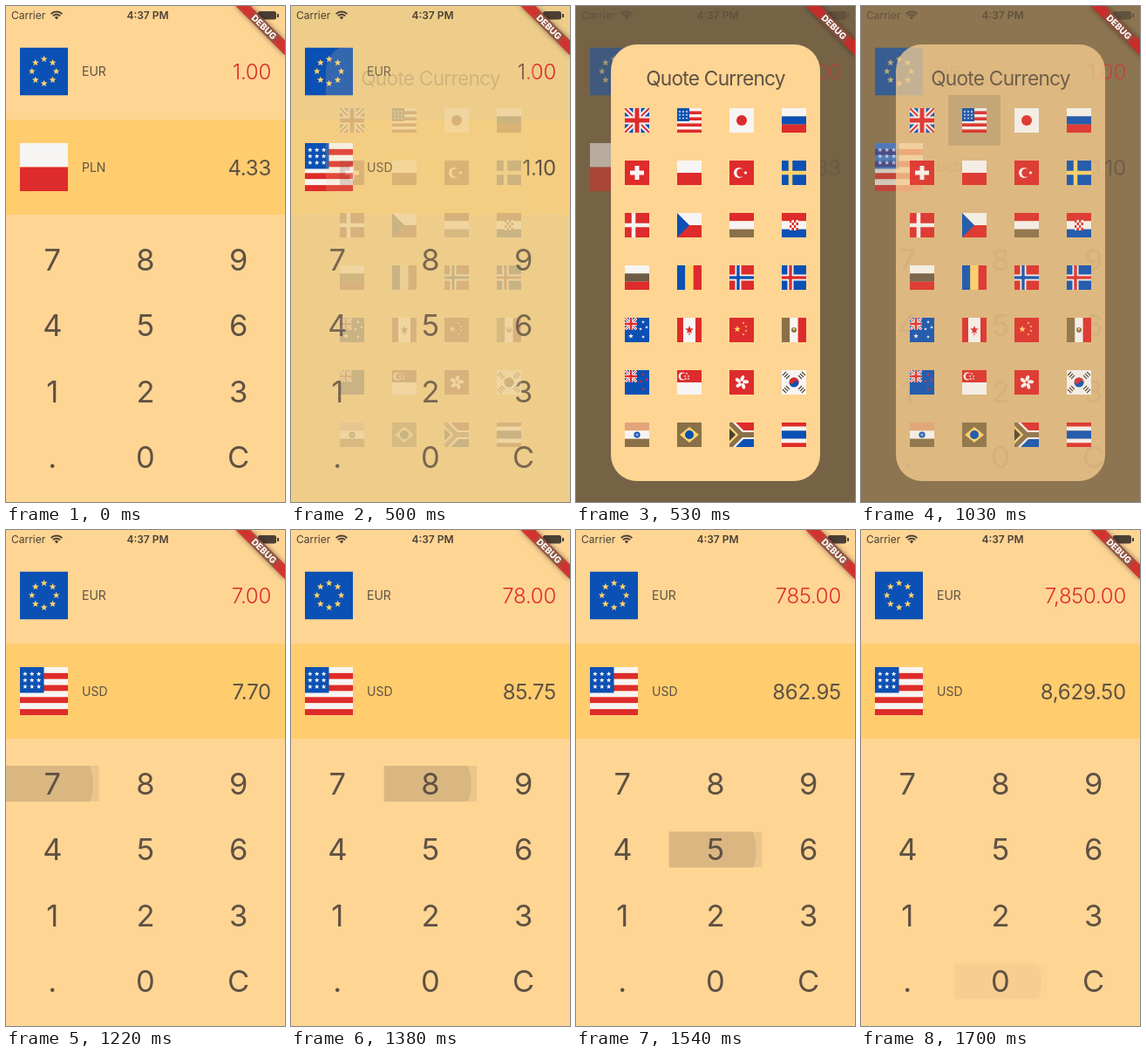
These frames come from a looping animation (320x568 px, 2200 ms). An HTML page with a canvas:

```html
<!DOCTYPE html>
<html lang="en">
<head>
<meta charset="utf-8">
<title>Currency converter</title>
<style>
html, body { margin: 0; width: 100%; height: 100%; overflow: hidden; background: #ffd594; }
canvas { display: block; }
</style>
</head>
<body>
<canvas id="stage" width="320" height="568"></canvas>
<script>
const LOOP = 2200, RATE = 1.099299;
const RED = '#de2b2b', BLUE = '#0b50b4', WHITE = '#f7f5f3', GREEN = '#8a7048', GOLD = '#ffd36a';
const PAPER = '#ffd594', INK = '#5f5143', DARK = '#4b4035';
const KEYS = '789456123.0C';
const stage = document.getElementById('stage').getContext('2d');
let g = stage;

// ---- drawing helpers ----
function rect(color, x, y, w, h) {
  g.fillStyle = color;
  g.fillRect(x, y, w, h);
}
function disc(color, x, y, r) {
  g.fillStyle = color;
  g.beginPath();
  g.arc(x, y, r, 0, 7);
  g.fill();
}
function poly(color, ...p) {
  g.fillStyle = color;
  g.beginPath();
  for (let i = 0; i < p.length; i += 2) g.lineTo(p[i], p[i + 1]);
  g.fill();
}
function panel(color, x, y, w, h, r) {
  g.fillStyle = color;
  g.beginPath();
  g.roundRect(x, y, w, h, r);
  g.fill();
}
function line(color, width, ...p) {
  g.strokeStyle = color;
  g.lineWidth = width;
  g.beginPath();
  for (let i = 0; i < p.length; i += 2) g.lineTo(p[i], p[i + 1]);
  g.stroke();
}
function star(color, x, y, r) {
  const p = [];
  for (let i = 0; i < 10; i++) {
    const a = i * Math.PI / 5, d = i % 2 ? r * 0.42 : r;
    p.push(x + d * Math.sin(a), y - d * Math.cos(a));
  }
  poly(color, ...p);
}
function text(s, x, y, size, color, { align = 'left', weight = 400, gap = 0 } = {}) {
  g.font = `${weight} ${size}px Inter, Roboto, sans-serif`;
  g.letterSpacing = gap + 'px';
  g.textAlign = align;
  g.fillStyle = color;
  g.fillText(s, x, y);
}
function clipped(x, y, w, h, draw) {
  g.save();
  g.beginPath();
  g.rect(x, y, w, h);
  g.clip();
  draw();
  g.restore();
}
function faded(alpha, draw) {
  g.save();
  g.globalAlpha *= alpha;
  draw();
  g.restore();
}

// ---- flags on a 28 x 28 grid ----
const rows = (...c) => c.forEach((color, i) => rect(color, 0, i * 28 / c.length, 28, 28 / c.length));
const cols = (...c) => c.forEach((color, i) => rect(color, i * 28 / c.length, 0, 28 / c.length, 28));
function cross(color, w, cx = 10) {
  rect(color, cx - w / 2, 0, w, 28);
  rect(color, 0, 14 - w / 2, 28, w);
}
function nordic(back, outer, inner) {
  rows(back);
  cross(outer, inner ? 7 : 4.5);
  if (inner) cross(inner, 3.4);
}
function jack(s) {
  clipped(0, 0, s, s, () => {
    g.scale(s / 28, s / 28);
    rows(BLUE);
    for (const [c, w] of [[WHITE, 6], [RED, 2]]) {
      line(c, w, 0, 0, 28, 28);
      line(c, w, 28, 0, 0, 28);
    }
    cross(WHITE, 9, 14);
    cross(RED, 5, 14);
  });
}
function southern(color) {
  rows(BLUE);
  jack(14);
  for (const [x, y] of [[21, 5], [18, 13], [25, 11], [21, 22]]) star(color, x, y, 2);
}
function crescent(x, y, r, back) {
  disc(WHITE, x, y, r);
  disc(back, x + r * 0.35, y, r * 0.8);
}
const flags = {
  eu() {
    rows(BLUE);
    for (let i = 0; i < 8; i++) {
      const a = i * Math.PI / 4;
      star(GOLD, 14.1 + 7.1 * Math.sin(a), 13.9 - 7.1 * Math.cos(a), 2.1);
    }
  },
  gb() { jack(28); },
  us() {
    rows(WHITE, RED, WHITE, RED, WHITE, RED, WHITE, RED);
    rect(BLUE, 0, 0, 14, 15);
    for (let i = 0; i < 9; i++) star(WHITE, 3 + i % 3 * 4, 4 + (i / 3 | 0) * 3.7, 1.5);
  },
  jp() { rows(WHITE); disc(RED, 14, 14, 6); },
  ru() { rows(WHITE, BLUE, RED); },
  ch() { rows(RED); rect(WHITE, 11.5, 6, 5, 16); rect(WHITE, 6, 11.5, 16, 5); },
  pl() { rows(WHITE, RED); },
  tr() { rows(RED); crescent(11, 14, 6, RED); star(WHITE, 18.5, 14, 2.6); },
  se() { nordic(BLUE, GOLD); },
  dk() { nordic(RED, WHITE); },
  cz() { rows(WHITE, RED); poly(BLUE, 0, 0, 14, 14, 0, 28); },
  hu() { rows(RED, WHITE, GREEN); },
  hr() {
    rows(RED, WHITE, BLUE);
    for (let i = 0; i < 16; i++)
      rect((i + (i >> 2)) % 2 ? WHITE : RED, 9 + i % 4 * 2.5, 8 + (i >> 2) * 3, 2.5, 3);
  },
  bg() { rows(WHITE, '#6e5c48', RED); },
  ro() { cols(BLUE, GOLD, RED); },
  no() { nordic(RED, WHITE, BLUE); },
  is() { nordic(BLUE, WHITE, RED); },
  au() { southern(WHITE); star(WHITE, 7, 21, 3); },
  ca() {
    rows(WHITE);
    rect(RED, 0, 0, 7, 28);
    rect(RED, 21, 0, 7, 28);
    star(RED, 14, 14, 5);
    rect(RED, 13.5, 14, 1, 6);
  },
  cn() {
    rows(RED);
    star(GOLD, 9, 13, 4);
    for (const [x, y] of [[16, 6], [19, 10], [19, 15], [16, 19]]) star(GOLD, x, y, 1.6);
  },
  mx() { cols(GREEN, WHITE, RED); disc(GREEN, 14, 14, 3); disc(GOLD, 14, 13, 1.2); },
  nz() { southern(RED); },
  sg() {
    rows(RED, WHITE);
    crescent(6, 7, 4.5, RED);
    for (const [x, y] of [[11, 4], [9, 7], [13, 7], [10, 10], [13, 10]]) star(WHITE, x, y, 1.4);
  },
  hk() {
    rows(RED);
    g.save();
    g.translate(14, 14);
    for (let i = 0; i < 5; i++) {
      g.fillStyle = WHITE;
      g.beginPath();
      g.ellipse(0.8, -4.6, 2, 3.6, 0.4, 0, 7);
      g.fill();
      g.rotate(Math.PI * 0.4);
    }
    g.restore();
  },
  kr() {
    rows(WHITE);
    disc(BLUE, 14, 14, 5.5);
    g.fillStyle = RED;
    g.beginPath();
    g.arc(14, 14, 5.5, 3.5, 6.64);
    g.fill();
    disc(RED, 11.5, 13.2, 2.5);
    disc(BLUE, 16.5, 14.8, 2.5);
    for (const x of [5, 23]) for (const y of [6, 22])
      for (const d of [-2, 0, 2]) {
        const s = (x - 14) * (y - 14) > 0 ? 1 : -1;
        line(DARK, 1.1, x + d - 2, y + s * (d + 2), x + d + 2, y + s * (d - 2));
      }
  },
  in() { rows('#e3a578', WHITE, GREEN); disc(BLUE, 14, 14, 3.6); disc('#7897cb', 14, 14, 2); },
  br() { rows(GREEN); poly(GOLD, 14, 5, 25, 14, 14, 23, 3, 14); disc(BLUE, 14, 14, 5); },
  za() {
    rows(RED, BLUE);
    for (const [c, w] of [[WHITE, 10], [GREEN, 5.5]]) {
      line(c, w, -2, -2, 14, 14, 30, 14);
      line(c, w, -2, 30, 14, 14, 30, 14);
    }
    poly(GOLD, 0, 4, 10, 14, 0, 24);
    poly(DARK, 0, 7, 7, 14, 0, 21);
  },
  th() { rows(RED, WHITE, BLUE, BLUE, WHITE, RED); }
};
function flag(name, x, y, size) {
  clipped(x, y, size, size, () => {
    g.translate(x, y);
    g.scale(size / 28, size / 28);
    flags[name]();
  });
}

// ---- screens ----
function statusBar() {
  text('Carrier', 6, 15, 12, DARK);
  text('4:37 PM', 162.5, 15, 12, DARK, { align: 'center', weight: 600 });
  g.strokeStyle = DARK;
  g.lineWidth = 2;
  for (const r of [9, 5.8]) {
    g.beginPath();
    g.arc(58, 15.5, r, -2.36, -0.78);
    g.stroke();
  }
  poly(DARK, 58, 15.5, 55.7, 12.8, 58, 11.8, 60.3, 12.8);
  panel(DARK, 289, 6, 21, 9.5, 2.5);
  rect(DARK, 311, 9, 2, 4);
}
function banner() {
  g.save();
  g.translate(320, 0);
  g.rotate(Math.PI / 4);
  g.save();
  g.shadowColor = 'rgba(0,0,0,.5)';
  g.shadowBlur = 6;
  const tint = g.createLinearGradient(-40, 0, 40, 0);
  [[0, '#d62a2a'], [0.22, '#d62a2a'], [0.32, '#90503e'], [0.7, '#90503e'], [0.8, '#d62a2a'], [1, '#d62a2a']]
    .forEach(stop => tint.addColorStop(...stop));
  g.globalAlpha = 0.88;
  rect(tint, -40, 28, 80, 12);
  g.restore();
  text('DEBUG', 0, 37.7, 10.2, '#fff', { align: 'center', weight: 800 });
  g.restore();
}
function amount(s, y, color, weight) {
  text(s, 304, y, 24, color, { align: 'right', weight, gap: -0.25 });
}
function amounts({ base, quote, mixed }) {
  amount(base, 84, RED, 300);
  if (mixed) clipped(250, 60, 21, 30, () => amount(base, 84, INK, 300));
  amount(quote, 193.5, INK, 400);
}
function press(key, strength) {
  const x = 106.7 * (key % 3), y = 270 + 75.4 * (key / 3 | 0);
  faded(strength, () => clipped(x, y, 106.7, 41, () => {
    rect('#ebc68c', x, y, 106.7, 41);
    disc('#dab681', x + 43, y + 21, 57);
  }));
}
function home(code, state, { next = state, mix = 1, paper = PAPER, band = 1, detail = 1 } = {}) {
  rect(paper, 0, 0, 320, 568);
  faded(band, () => rect('#ffcc6e', 0, 130, 320, 109));
  faded(detail, () => {
    statusBar();
    flag('eu', 16, 47.5, 55);
    text('EUR', 87, 80, 14, INK);
    flag(code === 'PLN' ? 'pl' : 'us', 16, 157, 55);
    text(code, 87, 189.5, 14, INK);
    for (const [s, k] of [[state, 1 - mix], [next, mix]]) {
      if (k <= 0) continue;
      if (s.key >= 0) press(s.key, k * s.glow);
      faded(k, () => amounts(s));
    }
    [...KEYS].forEach((c, i) =>
      text(c, 53.3 + 106.7 * (i % 3), 303 + 75.4 * (i / 3 | 0), 34.5, INK, { align: 'center' }));
  });
}
function dialog(color, alpha) {
  faded(alpha, () => panel(color, 40, 44, 240, 500, 30));
}

// Title and flags are painted once so they can fade as one layer.
const sheet = document.createElement('canvas');
sheet.width = 320;
sheet.height = 568;
g = sheet.getContext('2d');
text('Quote Currency', 160, 91.3, 22.7, INK, { align: 'center', gap: -0.75 });
'gb us jp ru ch pl tr se dk cz hu hr bg ro no is au ca cn mx nz sg hk kr in br za th'.split(' ')
  .forEach((name, i) => flag(name, 56 + 60 * (i % 4), 117 + 60 * (i >> 2), 28));
g = stage;
function choices(alpha, filter = 'none') {
  faded(alpha, () => {
    g.filter = filter;
    g.drawImage(sheet, 0, 0);
  });
}

// ---- timeline ----
const money = n => n.toLocaleString('en-US', { minimumFractionDigits: 2, maximumFractionDigits: 2 });
const start = { base: '1.00', quote: '4.33' };
const typed = [{ base: '1.00', quote: '1.10', mixed: true }];
[7, 78, 785, 7850].forEach((n, i) => typed.push({
  base: money(n), quote: money(n * RATE),
  key: KEYS.indexOf(String(n).at(-1)), glow: i < 3 ? 1 : 0.18
}));

function paint(t) {
  if (t < 500) {
    home('PLN', start);
  } else if (t < 530) {
    home('USD', typed[0], { paper: '#eecd8a', band: 0.35 });
    dialog('#eecd8a', 0.18);
    choices(0.2, 'saturate(0.3)');
  } else if (t < 1030) {
    home('PLN', start, { paper: '#766346', band: 0, detail: 0.5 });
    dialog(PAPER, 1);
    choices(1);
  } else if (t < 1060) {
    home('USD', typed[0], { paper: '#8c7550', band: 0, detail: 0.65 });
    dialog(PAPER, 0.7);
    rect('rgba(70,70,70,.16)', 100, 102, 60, 58);
    choices(0.87);
  } else {
    // each key takes 160 ms: two blended 30 ms steps, then a hold
    const since = t - 1160;
    const i = Math.max(0, Math.min(4, Math.floor(since / 160) + 1));
    const step = Math.floor((since - (i - 1) * 160) / 30) + 1;
    home('USD', typed[Math.max(0, i - 1)], { next: typed[i], mix: i ? Math.min(1, step / 3) : 1 });
  }
  banner();
}

const began = performance.now();
function tick(now) {
  paint(Math.max(0, now - began) % LOOP);
  requestAnimationFrame(tick);
}
paint(0);
requestAnimationFrame(tick);
</script>
</body>
</html>
```
